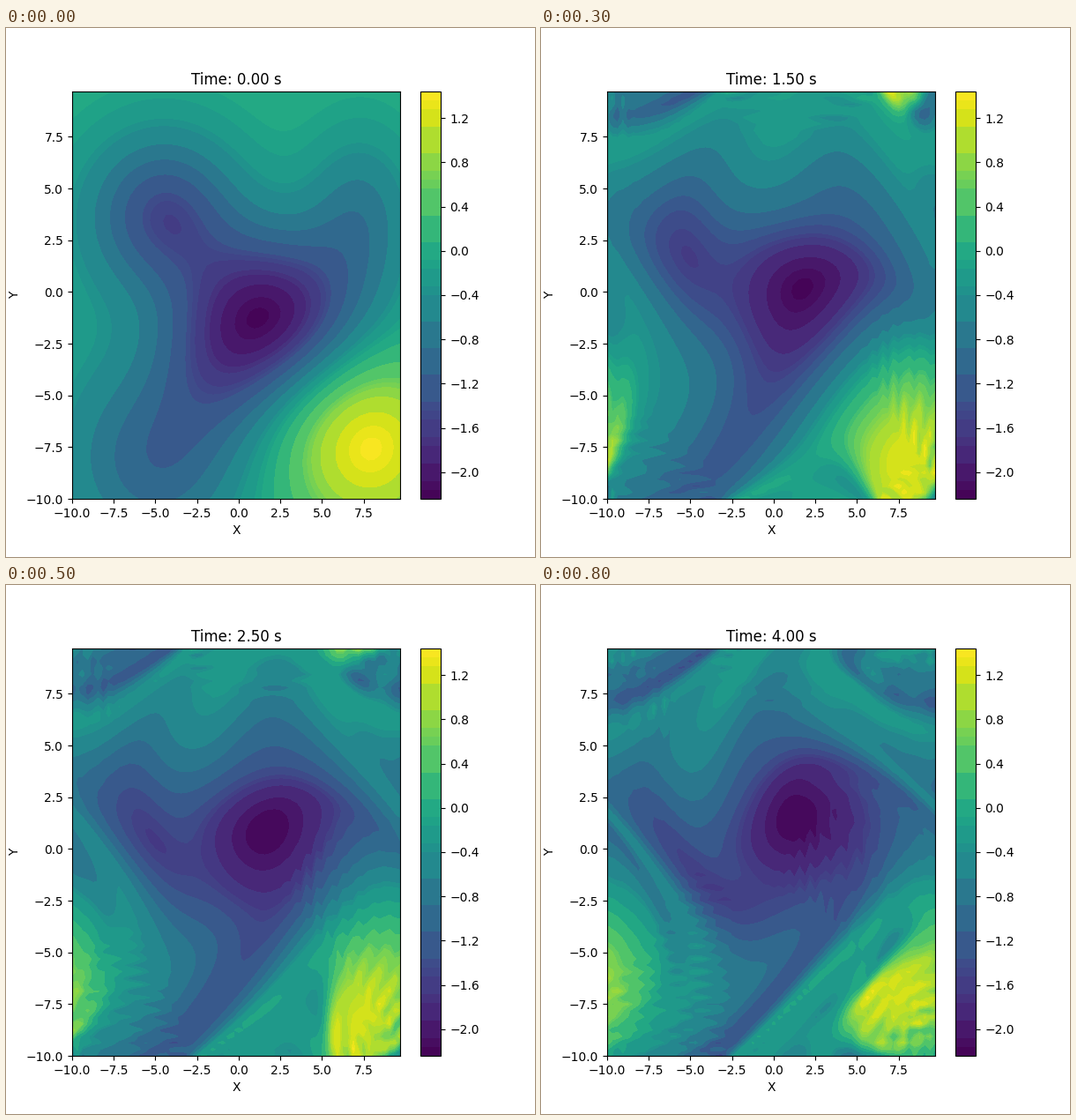
Write a matplotlib script that moves like this. It is 600 px wide and 600 px high and loops after 900 ms.

```python
import numpy as np
import matplotlib.pyplot as plt
from matplotlib.animation import FuncAnimation
from matplotlib.colors import ListedColormap, Normalize

N, SIZE = 64, 20.0
STEP = SIZE / N
NU = 0.001
FRAMES, FRAME_TIME, SUBSTEPS = 9, 0.5, 30

axis = -SIZE / 2 + STEP * np.arange(N)
X, Y = np.meshgrid(axis, axis)

k = 2 * np.pi * np.fft.fftfreq(N, STEP)
K2 = k[None, :] ** 2 + k[:, None] ** 2
K2[0, 0] = 1.0

# x, y, strength, squared width in x, squared width in y
VORTICES = [
    (2.2, -0.9, -1.90, 28, 15),
    (-1.3, -3.9, -0.75, 18, 14),
    (-4.5, 3.8, -1.40, 20, 14),
    (-5.0, -8.3, -1.02, 28, 20),
    (7.3, 3.8, -0.70, 10, 14),
    (-10.0, -2.0, -0.12, 20, 30),
    (7.8, -7.4, 1.43, 24, 18),
]


def initial_vorticity():
    w = sum(a * np.exp(-(X - x) ** 2 / sx - (Y - y) ** 2 / sy)
            for x, y, a, sx, sy in VORTICES)
    return np.interp(w, [w.min(), w.max()], [-2.19, 1.385])


def diff(f, ax):
    return (np.roll(f, -1, ax) - np.roll(f, 1, ax)) / (2 * STEP)


def laplacian(f):
    near = sum(np.roll(f, s, ax) for s in (-1, 1) for ax in (0, 1))
    return (near - 4 * f) / STEP ** 2


def rate(w):
    w_hat = np.fft.fft2(w)
    w_hat[0, 0] = 0
    psi = np.fft.ifft2(-w_hat / K2).real
    return (diff(psi, 1) * diff(w, 0) - diff(psi, 0) * diff(w, 1)
            + NU * laplacian(w))


def advance(w, dt):
    a = rate(w)
    b = rate(w + dt / 2 * a)
    c = rate(w + dt / 2 * b)
    d = rate(w + dt * c)
    return w + dt / 6 * (a + 2 * b + 2 * c + d)


def simulate():
    fields = [initial_vorticity()]
    for _ in range(FRAMES - 1):
        w = fields[-1]
        for _ in range(SUBSTEPS):
            w = advance(w, FRAME_TIME / SUBSTEPS)
        fields.append(w)
    return fields


def band_colors(levels, w):
    """Viridis per band, with neighbouring similar shades merged."""
    t = (np.arange(len(levels) - 1) + 0.5) / (len(levels) - 1)
    rgb = np.round(255 * plt.get_cmap("viridis")(t)[:, :3]).astype(int)
    keys = rgb >> np.array([5, 4, 5])
    area = np.histogram(w, levels)[0] + 5
    merged = np.empty(rgb.shape)
    for key in np.unique(keys, axis=0):
        same = (keys == key).all(axis=1)
        merged[same] = np.average(rgb[same], axis=0, weights=area[same])
    return ListedColormap(merged / 255)


def draw_field(w):
    cs = ax.contourf(X, Y, w, 50)
    levels = cs.levels
    cs.set_norm(Normalize(levels[0], levels[-1]))
    cs.set_cmap(band_colors(levels, w))
    return cs


def update(i):
    ax.clear()
    draw_field(fields[i])
    ax.set_title(f"Time: {i * FRAME_TIME:.2f} s")
    ax.set_xlabel("X")
    ax.set_ylabel("Y")
    return []


fields = simulate()
fig, ax = plt.subplots(figsize=(6, 6), dpi=100)
fig.colorbar(draw_field(fields[0]), ax=ax)

anim = FuncAnimation(fig, update, frames=FRAMES, init_func=lambda: update(0),
                     interval=100, repeat=True, repeat_delay=0, blit=False)
plt.show()
```
